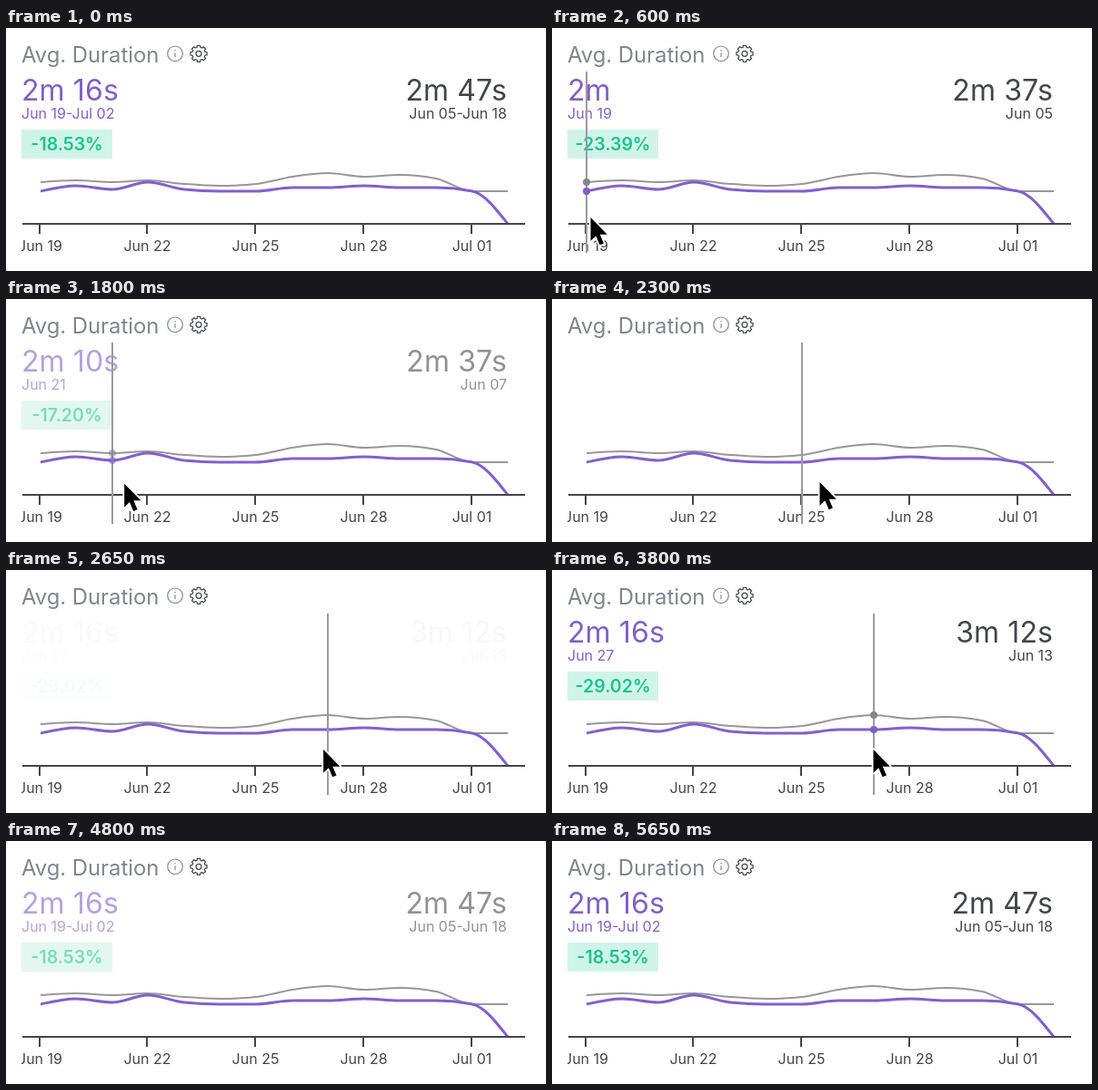
Animation, 594 px wide and 268 px high, one loop 5700 ms. Source, as an HTML page:

```html
<!DOCTYPE html>
<html lang="en">
<head>
<meta charset="utf-8">
<title>Avg. Duration</title>
<style>
  html, body { margin: 0; width: 100%; height: 100%; overflow: hidden; background: #fff; }
  svg { display: block; width: 594px; height: 268px; font-family: Inter, "Liberation Sans", sans-serif; }
  .title { font-size: 23.8px; fill: #7f858e; }
  .big { font-size: 32px; letter-spacing: .1px; }
  .small { font-size: 16px; }
  .now { fill: #8060c6; }
  .before { fill: #42454b; text-anchor: end; }
  .change { font-size: 19.5px; font-weight: 600; fill: #17c491; text-anchor: middle; }
  .axis { stroke: #43464b; stroke-width: 2; fill: none; }
  .tick { font-size: 16px; fill: #43464b; text-anchor: middle; }
  .curve { fill: none; stroke-linejoin: round; }
</style>
</head>
<body>
<svg viewBox="0 0 594 268">
  <defs><clipPath id="plot"><rect x="17" y="0" width="560" height="268"/></clipPath></defs>

  <text class="title" x="17" y="37.5">Avg. Duration</text>
  <g fill="none" stroke="#858a92" stroke-width="1.2">
    <circle cx="186" cy="28.3" r="8.3"/>
    <path d="M186 27.2v5M186 24v1.5"/>
  </g>
  <g transform="translate(212 28.3)" fill="none" stroke="#45484e" stroke-width="1.25" stroke-linejoin="round">
    <path id="gear"/>
    <circle r="3"/>
  </g>

  <g id="stats">
    <text id="nowValue" class="big now" x="17" y="80.3"></text>
    <text id="nowDate" class="small now" x="17" y="100"></text>
    <text id="beforeValue" class="big before" x="551" y="80.3"></text>
    <text id="beforeDate" class="small before" x="551" y="100"></text>
    <rect x="17" y="112" width="100" height="32" fill="#d0f3e7"/>
    <text id="change" class="change" x="67" y="135"></text>
  </g>

  <g clip-path="url(#plot)">
    <g id="ticks"></g>
    <path id="beforeLine" class="curve" stroke="#97979b" stroke-width="2"/>
    <path id="nowLine" class="curve" stroke="#8160ce" stroke-width="3"/>
    <path id="axis" class="axis"/>
  </g>

  <g id="hover">
    <path d="M0 48V248" stroke="#9b9b9f" stroke-width="2"/>
    <g id="dots">
      <circle id="beforeDot" r="4" fill="#85858a"/>
      <circle id="nowDot" r="4" fill="#7f5cc8"/>
    </g>
  </g>
  <g id="cursor">
    <path transform="translate(.5 2) scale(.89)" d="M0 0V29L6.5 22.8 11.3 34 16.2 32 11.5 21H20.5Z"
          fill="#000" stroke="#fff" stroke-width="4" paint-order="stroke" stroke-linejoin="round"/>
  </g>
</svg>
<script>
const LOOP = 5700, STEP = 50;
const X0 = 37.6, DX = 39.58, BASE = 216, SECONDS_PER_PX = 3.42;
const $ = id => document.getElementById(id);

// Seconds per day, this period and the one before
const now = [120.28, 146.3, 130, 158, 130, 123, 123, 137, 136.28, 144, 137, 137, 123, 0];
const before = [157, 166, 157, 166, 151, 144, 151, 178, 192, 178, 185, 171, 123, 123];

// Pointer path: time, x, y
const route = [
  [0, -30, 224], [50, -8, 218], [100, 18, 214], [250, 38, 208], [600, 42, 207],
  [1350, 90, 203], [1700, 112, 202], [2000, 165, 201], [2200, 225, 200],
  [2300, 294, 200], [2450, 325, 198], [2600, 348, 196], [3000, 353, 196],
  [4250, 353, 196], [4400, 356, 222], [4500, 358, 250], [4600, 360, 275], [LOOP, 360, 275]
];

// The chart snaps to whole units: one pixel across, two down
const dayX = i => Math.round(X0 + i * DX);
const valueY = s => BASE - 2 * Math.round(s / SECONDS_PER_PX / 2);
const pad = n => String(n).padStart(2, "0");
const nowDay = i => i < 12 ? "Jun " + (19 + i) : "Jul " + pad(i - 11);
const beforeDay = i => "Jun " + pad(5 + i);

function duration(s) {
  const m = Math.floor(s / 60), rest = Math.floor(s % 60);
  return [m && m + "m", (rest || !m) && rest + "s"].filter(Boolean).join(" ");
}

// Monotone cubic through evenly spaced points
function curve(values) {
  const y = values.map(valueY), last = y.length - 1;
  const slope = y.slice(1).map((v, i) => (v - y[i]) / DX);
  const tan = y.map((_, i) => {
    if (i === 0 || i === last) return 0;
    const a = slope[i - 1], b = slope[i];
    return (Math.sign(a) + Math.sign(b)) * Math.min(Math.abs(a), Math.abs(b), Math.abs(a + b) / 4);
  });
  tan[0] = (3 * slope[0] - tan[1]) / 2;
  tan[last] = (3 * slope[last - 1] - tan[last - 1]) / 2;
  let d = `M${dayX(0)} ${y[0]}`;
  for (let i = 0; i < last; i++) {
    const h = DX / 3;
    d += `C${dayX(i) + h} ${y[i] + tan[i] * h} ${dayX(i + 1) - h} ${y[i + 1] - tan[i + 1] * h} ${dayX(i + 1)} ${y[i + 1]}`;
  }
  return d;
}

function gear() {
  const points = [];
  for (let k = 0; k < 8; k++) {
    for (const [offset, r] of [[-.27, 7.2], [-.18, 9.2], [.18, 9.2], [.27, 7.2]]) {
      const a = k * Math.PI / 4 + offset;
      points.push((r * Math.cos(a)).toFixed(2) + " " + (r * Math.sin(a)).toFixed(2));
    }
  }
  return "M" + points.join("L") + "Z";
}

function pointer(t) {
  const k = Math.max(1, route.findIndex(p => p[0] >= t));
  const [t0, x0, y0] = route[k - 1], [t1, x1, y1] = route[k];
  const f = (t - t0) / (t1 - t0);
  return [x0 + (x1 - x0) * f, y0 + (y1 - y0) * f];
}

function dayAt(t) {
  const [x, y] = pointer(t);
  if (x < 16 || y > 248) return -1;
  return Math.max(0, Math.min(13, Math.round((x - X0) / DX)));
}

function fade(age) {
  const f = Math.max(0, Math.min(1, (age - 50) / 450));
  return f * f * (3 - 2 * f);
}

// When each hovered day begins
const spans = [{ start: -1000, day: -1 }];
for (let t = 0; t < LOOP; t += STEP) {
  const day = dayAt(t);
  if (day !== spans[spans.length - 1].day) spans.push({ start: t, day });
}

$("gear").setAttribute("d", gear());
$("nowLine").setAttribute("d", curve(now));
$("beforeLine").setAttribute("d", curve(before));
let axis = `M18 ${BASE}H571`;
for (let i = 0; i < 13; i += 3) {
  const x = dayX(i) - 1;
  axis += `M${x} ${BASE}V227`;
  $("ticks").insertAdjacentHTML("beforeend", `<text class="tick" x="${x + .5}" y="246">${nowDay(i)}</text>`);
}
$("axis").setAttribute("d", axis);

function showStats(day) {
  const all = day < 0;
  const a = all ? 136.06 : now[day], b = all ? 167 : before[day];
  $("nowValue").textContent = duration(a);
  $("beforeValue").textContent = duration(b);
  $("nowDate").textContent = all ? "Jun 19-Jul 02" : nowDay(day);
  $("beforeDate").textContent = all ? "Jun 05-Jun 18" : beforeDay(day);
  $("change").textContent = ((a / b - 1) * 100).toFixed(2) + "%";
}

function render(t) {
  const { start, day } = spans.filter(s => s.start <= t).pop();
  const alpha = fade(t - start);
  showStats(day);
  $("stats").setAttribute("opacity", alpha);
  $("hover").style.display = day < 0 ? "none" : "";
  if (day >= 0) {
    $("hover").setAttribute("transform", `translate(${dayX(day)} 0)`);
    $("dots").setAttribute("opacity", alpha);
    $("nowDot").setAttribute("cy", valueY(now[day]));
    $("beforeDot").setAttribute("cy", valueY(before[day]));
  }
  $("cursor").setAttribute("transform", `translate(${pointer(t).join(" ")})`);
}

const begin = performance.now();
function tick() {
  const t = Math.max(0, performance.now() - begin) % LOOP;
  render(Math.floor(t / STEP) * STEP);
  requestAnimationFrame(tick);
}
tick();
</script>
</body>
</html>
```
